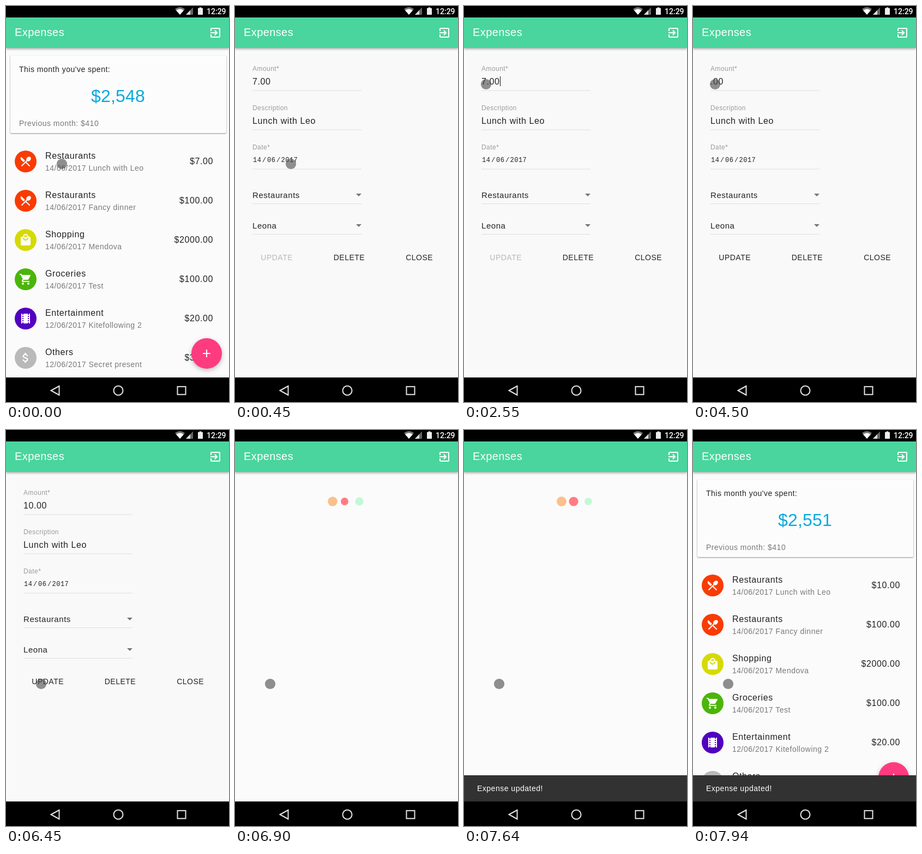
These frames come from a looping animation (409x726 px, 8000 ms). An HTML page:

```html
<!DOCTYPE html>
<html lang="en">
<head>
<meta charset="utf-8">
<title>Expenses</title>
<style>
  html, body { margin: 0; height: 100%; overflow: hidden; background: #fbfbfb; }
  svg { display: block; width: 409px; height: 726px; font-family: "Liberation Sans", Arial, sans-serif; white-space: pre; }
  .s12 { font-size: 12px; letter-spacing: .45px; }
  .s14 { font-size: 14px; letter-spacing: .5px; }
  .s15 { font-size: 15px; letter-spacing: .55px; }
  .s16 { font-size: 16px; letter-spacing: .6px; }
  .s20 { font-size: 20px; letter-spacing: .4px; }
  .s32 { font-size: 32px; letter-spacing: .2px; }
  .mono { font: 12px "Liberation Mono", monospace; letter-spacing: .5px; }
  .clock { font: 500 14px Roboto, sans-serif; }
  .bar { filter: drop-shadow(0 2px 2px rgba(0,0,0,.32)); }
  .card { filter: drop-shadow(0 1px 1px rgba(0,0,0,.45)); }
  .fab { filter: drop-shadow(0 3px 4px rgba(0,0,0,.25)); }
</style>
</head>
<body>
<svg id="stage" viewBox="0 0 409 726"></svg>
<script>
const INK = '#222', GREY = '#7a7a7a', PALE = '#9b9b9b';
const icons = {
  exit: 'M10.09 15.59L11.5 17l5-5-5-5-1.41 1.41L12.67 11H3v2h9.67l-2.58 2.59zM19 3H5c-1.11 0-2 .9-2 2v4h2V5h14v14H5v-4H3v4c0 1.1.89 2 2 2h14c1.1 0 2-.9 2-2V5c0-1.1-.9-2-2-2z',
  food: 'M8.1 13.34l2.83-2.83L3.91 3.5c-1.56 1.56-1.56 4.09 0 5.66l4.19 4.18zm6.78-1.81c1.53.71 3.68.21 5.27-1.38 1.91-1.91 2.28-4.65.81-6.12-1.46-1.46-4.2-1.1-6.12.81-1.59 1.59-2.09 3.74-1.38 5.27L3.7 19.87l1.41 1.41L12 14.41l6.88 6.88 1.41-1.41L13.41 13l1.47-1.47z',
  bag: 'M19 6h-2c0-2.76-2.24-5-5-5S7 3.24 7 6H5c-1.1 0-2 .9-2 2v12c0 1.1.9 2 2 2h14c1.1 0 2-.9 2-2V8c0-1.1-.9-2-2-2zm-7-3c1.66 0 3 1.34 3 3H9c0-1.66 1.34-3 3-3zm0 10c-2.76 0-5-2.24-5-5h2c0 1.66 1.34 3 3 3s3-1.34 3-3h2c0 2.76-2.24 5-5 5z',
  cart: 'M7 18a2 2 0 1 0 0 4 2 2 0 0 0 0-4zM1 2v2h2l3.6 7.59-1.35 2.45C4.5 15.3 5.4 17 7 17h12v-2H7.42c-.14 0-.25-.11-.25-.25l.03-.12.9-1.63h7.45c.75 0 1.41-.41 1.75-1.03l3.58-6.49c.4-.7-.1-1.48-.88-1.48H5.21l-.94-2H1zm16 16a2 2 0 1 0 0 4 2 2 0 0 0 0-4z',
  film: 'M18 3v2h-2V3H8v2H6V3H4v18h2v-2h2v2h8v-2h2v2h2V3h-2zM8 17H6v-2h2v2zm0-4H6v-2h2v2zm0-4H6V7h2v2zm10 8h-2v-2h2v2zm0-4h-2v-2h2v2zm0-4h-2V7h2v2z',
  money: 'M11.8 10.9c-2.27-.59-3-1.2-3-2.15 0-1.09 1.01-1.85 2.7-1.85 1.78 0 2.44.85 2.5 2.1h2.21c-.07-1.72-1.12-3.3-3.21-3.81V3h-3v2.16c-1.94.42-3.5 1.68-3.5 3.61 0 2.31 1.91 3.46 4.7 4.13 2.5.6 3 1.48 3 2.41 0 .69-.49 1.79-2.7 1.79-2.06 0-2.87-.92-2.98-2.1h-2.2c.12 2.19 1.76 3.42 3.68 3.83V21h3v-2.15c1.95-.37 3.5-1.5 3.5-3.55 0-2.84-2.43-3.81-4.7-4.4z',
  plus: 'M19 13h-6v6h-2v-6H5v-2h6V5h2v6h6z'
};

const text = (x, y, size, str, fill = INK, extra = '') =>
  `<text x="${x}" y="${y}" class="${size}" fill="${fill}" ${extra}>${str}</text>`;
const rect = (x, y, w, h, fill, extra = '') =>
  `<rect x="${x}" y="${y}" width="${w}" height="${h}" fill="${fill}" ${extra}/>`;
const icon = (name, cx, cy) =>
  `<path d="${icons[name]}" fill="#fff" transform="translate(${cx - 12} ${cy - 12})"/>`;

const rows = [
  ['food', '#f93b02', 'Restaurants', '14/06/2017 Lunch with Leo', '$7.00'],
  ['food', '#f93b02', 'Restaurants', '14/06/2017 Fancy dinner', '$100.00'],
  ['bag', '#d5da02', 'Shopping', '14/06/2017 Mendova', '$2000.00'],
  ['cart', '#4bb509', 'Groceries', '14/06/2017 Test', '$100.00'],
  ['film', '#5200c0', 'Entertainment', '12/06/2017 Kitefollowing 2', '$20.00'],
  ['money', '#b9b9b9', 'Others', '12/06/2017 Secret present', '$35.00']
];
const row = ([glyph, color, title, note, price], i) => `
  <g transform="translate(0 ${72 * i})">
    <circle cx="36" cy="285" r="20" fill="${color}"/>${icon(glyph, 36, 285)}
    ${text(72, 280, 's16', title)}${text(72, 302, 's14', note, GREY)}
    ${text(380, 290, 's16', price, INK, `text-anchor="end" ${i ? '' : 'id="price"'}`)}
  </g>`;

const list = `<g id="list">
  ${rect(8, 91, 396, 142, '#fcfcfc', 'rx="2" class="card"')}
  ${text(24, 121, 's14', 'This month you\'ve spent:')}
  ${text(156, 176, 's32', '', '#0aa9dc', 'id="total"')}
  ${text(24, 220, 's14', 'Previous month: $410', GREY)}
  ${rows.map(row).join('')}
  <g id="fab"><circle cx="368" cy="637" r="28" fill="#ff3b80" class="fab"/>${icon('plus', 368, 637)}</g>
</g>`;

const underline = y => rect(32, y, 200, 1, '#dedede');
const field = (y, label) => text(32, y, 's12', label, PALE) + underline(y + 36);
const select = (y, value) => text(32, y, 's15', value) + underline(y + 10) +
  `<path d="M222 ${y - 8}h10l-5 5z" fill="#757575"/>`;
const date = [['14', 33], ['/', 50], ['06', 59], ['/', 76], ['2017', 84.5]];

const form = `<g id="form">
  ${rect(5, 86, 400, 591, '#f9f9f9')}
  ${field(118.5, 'Amount*')}${text(32, 144, 's16', '', INK, 'id="amount"')}
  ${field(190.5, 'Description')}${text(32, 216, 's16', 'Lunch with Leo')}
  ${field(262.5, 'Date*')}${date.map(([s, x]) => text(x, 286, 'mono', s)).join('')}
  ${select(352, 'Restaurants')}${select(408, 'Leona')}
  ${text(47.3, 466, 's14', 'UPDATE', INK, 'id="update"')}
  ${text(180.7, 466, 's14', 'DELETE')}${text(313.2, 466, 's14', 'CLOSE')}
  ${rect(0, 129, 1, 18, '#111', 'id="caret"')}
</g>`;

const dots = [[179, '#fbc08c'], [201, '#ff7c82'], [228, '#c2f8d5']];
const loader = `<g id="loader">${dots.map(([x, c]) => `<circle cx="${x}" cy="131" fill="${c}"/>`).join('')}</g>`;

const chrome = `
  ${rect(0, 21, 409, 56, '#49d59d', 'class="bar"')}
  ${text(16, 55, 's20', 'Expenses', '#fff')}${icon('exit', 384, 49)}
  ${rect(0, 0, 409, 21, '#000')}
  <path d="M310 5.5Q319-1.5 328 5.5L319 16z" fill="#777"/>
  <path d="M312 8Q319 3 326 8L319 16z" fill="#fff"/>
  <path d="M343 2.5V16H330z" fill="#666"/><path d="M338 7.7V16H330z" fill="#ddd"/>
  <path d="M352 4h2.5V2.5h4V4h2.5v12h-9z" fill="#eee"/>
  ${text(368, 15, 'clock', '12:29', '#fff')}`;

const nav = `${rect(0, 681, 409, 45, '#000')}
  <g fill="none" stroke="#e6e6e6" stroke-width="2">
    <path d="M82.5 705l15-8.2v16.4z"/><circle cx="206" cy="705" r="8.5"/>
    <rect x="314.5" y="697.8" width="15" height="14.5"/>
  </g>`;

const snackbar = `<g id="snack">${rect(0, 633, 409, 48, '#323232')}
  ${text(24, 662, 's14', 'Expense updated!', '#fff')}</g>`;

document.getElementById('stage').innerHTML = rect(0, 0, 409, 726, '#fbfbfb') + list + form + loader +
  snackbar + chrome + nav + '<circle id="touch" r="9.6" fill="#464646" fill-opacity=".6"/>';

const $ = id => document.getElementById(id);
const show = (id, on) => $(id).setAttribute('visibility', on ? 'visible' : 'hidden');

// Latest entry whose start time has passed
const at = (track, t) => track.filter(([start]) => start <= t).pop().slice(1);

const touchTrack = [
  [0, 102.5, 289.5], [1050, 92, 272], [1200, 66, 222], [1350, 41, 176.5], [1500, 33, 150],
  [1650, 33, 141], [1800, 38, 139], [1950, 43.5, 142], [2100, 40.5, 142.5], [2400, 40.5, 143.5],
  [5400, 45, 190], [5550, 58, 330], [5700, 70, 440], [5850, 72, 502], [6000, 64.5, 465.5]
];
const amountTrack = [[0, '7.00'], [3900, '.00'], [4950, '10.00']];
const caretTrack = [[0, 0], [2550, 66], [3000, 0], [3450, 41], [3900, 32], [4500, 0], [4950, 51], [5400, 0]];
const snackTrack = [[0, 48], [7340, 25], [7490, 0]];

function draw(t) {
  const listOn = t < 450 || t >= 7790;
  const formOn = t >= 450 && t < 6600;
  const saved = t >= 6600;
  show('list', listOn);
  show('form', formOn);
  show('loader', !listOn && !formOn);
  show('snack', t >= 7340);

  $('price').textContent = saved ? '$10.00' : '$7.00';
  $('total').textContent = saved ? '$2,551' : '$2,548';
  show('fab', listOn && (t < 450 || t >= 7940));

  $('amount').textContent = at(amountTrack, t)[0];
  $('update').setAttribute('fill', t < 3900 ? '#b9b9b9' : INK);
  const [caretX] = at(caretTrack, t);
  show('caret', formOn && caretX);
  $('caret').setAttribute('x', caretX);

  const tick = Math.floor((t - 7340) / 150);
  [...$('loader').children].forEach((dot, i) =>
    dot.setAttribute('r', 8 + 1.2 * Math.sin(tick * .95 - 1 + i * 1.75)));

  $('snack').setAttribute('transform', `translate(0 ${at(snackTrack, t)[0]})`);
  const [x, y] = at(touchTrack, t);
  $('touch').setAttribute('cx', x);
  $('touch').setAttribute('cy', y);
}

function loop() {
  draw(performance.now() % 8000);
  requestAnimationFrame(loop);
}
loop();
</script>
</body>
</html>
```
